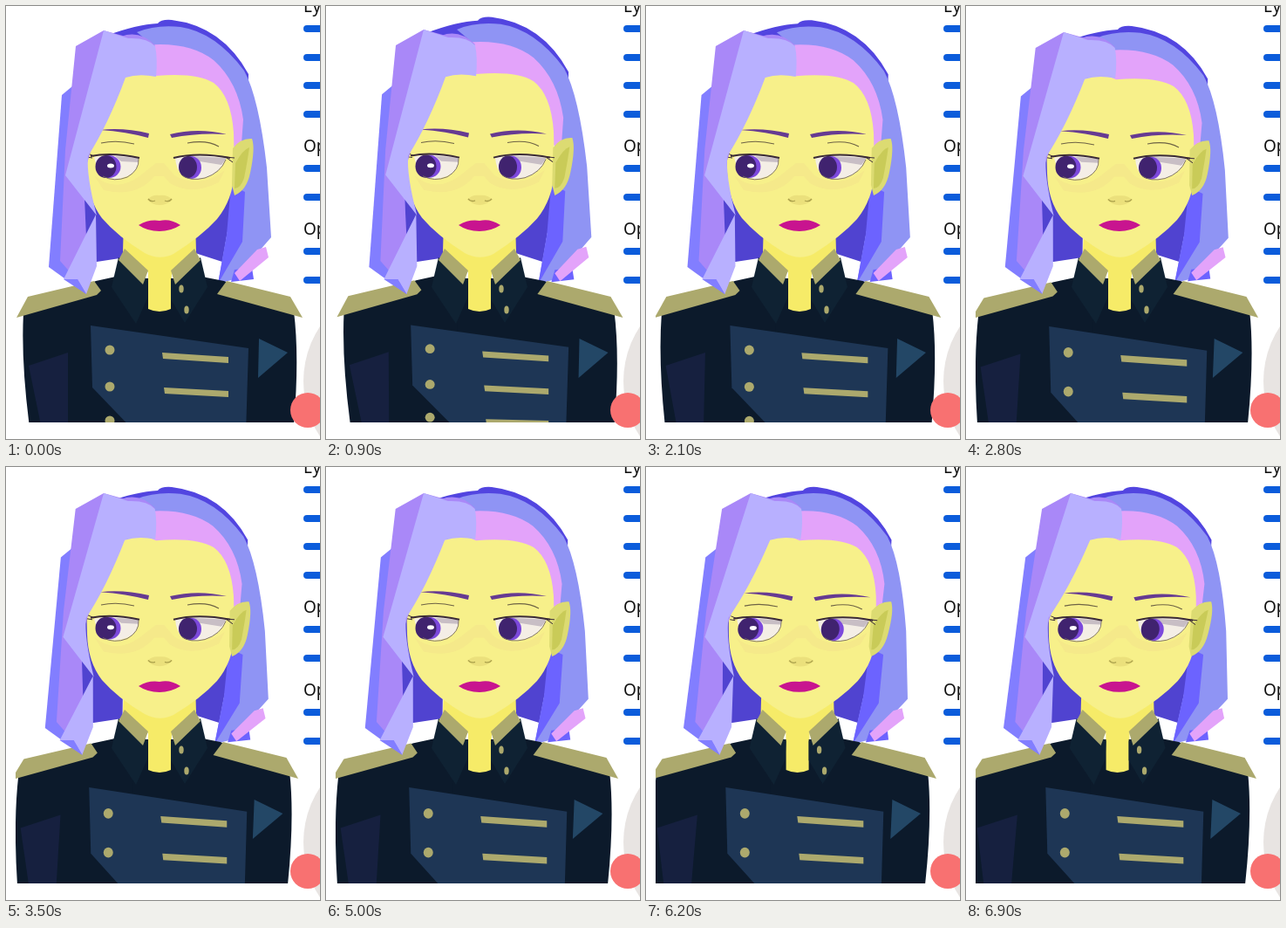
Recreate the animation shown at these times as an HTML page with a canvas. Size 360 by 496 pixels, loop 7000 ms.

```html
<!DOCTYPE html>
<html lang="en">
<head>
<meta charset="utf-8">
<title>Avatar editor</title>
<style>
  html, body { margin: 0; width: 100%; height: 100%; overflow: hidden; background: #fff; }
  body { position: relative; }
  canvas { position: absolute; left: 0; top: 0; }
  .label { position: absolute; left: 341px; font: 19px/24px "Noto Sans", "Open Sans", sans-serif; color: #111; white-space: nowrap; }
  .bar { position: absolute; left: 341px; width: 60px; height: 8px; border-radius: 4px; background: #0b5cdb; }
  .disc { position: absolute; border-radius: 50%; }
  .grey { left: 341px; top: 316px; width: 228px; height: 228px; background: #e8e4e2; clip-path: inset(36px 0 0 0); }
  .coral { left: 326px; top: 443px; width: 40px; height: 40px; background: #f87171; }
</style>
</head>
<body>
<div class="disc grey"></div>
<canvas id="stage" width="360" height="496"></canvas>
<div class="disc coral"></div>
<script>
const ctx = document.getElementById('stage').getContext('2d');
const LOOP = 7000;

// Side panel: a label with evenly spaced sliders below it.
function sliders(text, y, count) {
  const add = (cls, top, content) => {
    const el = document.createElement('div');
    el.className = cls;
    el.style.top = top + 'px';
    el.textContent = content;
    document.body.append(el);
  };
  add('label', y - 38, text);
  for (let i = 0; i < count; i++) add('bar', y - 4 + i * 32.5, '');
}
sliders('Eyes', 26, 4);
sliders('Open', 186, 2);
sliders('Open', 281, 2);

// lift: crown down, turn: head to the right, sway: shoulders to the right
const rest = { lift: 0, turn: 0, sway: 0 };
const raised = { lift: -5, turn: 0, sway: 1 };
const sunk = { lift: 7, turn: 0, sway: -7 };
const turned = { lift: 7, turn: 8, sway: -10 };
const keys = [[0, rest], [1500, raised], [2800, sunk], [5000, sunk], [6200, turned], [LOOP, turned]];

// Matrix that shifts height y1 by (dx1, dy1), height y2 by (dx2, dy2), and linearly between.
function slide(y1, dx1, dy1, y2, dx2, dy2) {
  const kx = (dx2 - dx1) / (y2 - y1), ky = (dy2 - dy1) / (y2 - y1);
  return [1, 0, kx, 1 + ky, dx1 - kx * y1, dy1 - ky * y1];
}

const moves = {
  back: p => slide(16, p.turn * .75, p.lift, 290, p.sway * .5, 0),
  face: p => slide(80, p.turn * .5, p.lift * .6, 288, 0, 0),
  features: p => slide(184, p.turn * .35, p.turn * .1 + p.lift * .1, 251, 0, 0),
  ear: p => slide(155, (p.sway + p.turn) / 2, p.lift * .3, 217, p.sway * .4, 0),
  front: p => slide(29, p.turn, p.lift * .3, 299, p.sway * .6, 0),
  collar: p => slide(0, -p.turn * .3, 0, 1, -p.turn * .3, 0),
  left: p => slide(315, p.sway * .5, p.lift * .2, 477, p.sway * 1.9, p.lift * .2),
  right: p => slide(315, p.sway * .6, 0, 477, p.sway, 0),
  panel: p => {
    const dx = p.sway * .25 - p.turn * .4;
    return slide(394, dx, p.lift * .4, 436, dx, p.lift * .8);
  }
};

const fill = (color, d) => ({ color, path: new Path2D(d) });
const line = (color, width, d) => ({ color, width, path: new Path2D(d) });
const dot = (color, x, y, rx, ry = rx) => {
  const path = new Path2D();
  path.ellipse(x, y, rx, ry, 0, 0, 7);
  return { color, path };
};

const navy = '#0c1a2b', coat = '#1e3655', lapel = '#0f2233', khaki = '#aca96d';
const skin = '#f7f08a', neck = '#f6eb68', brow = '#663a92', ink = '#3a2a37';
const white = '#f4eee6', shade = '#c8bec5', iris = '#40236f', glow = '#7c48dc';
const indigo = '#5245e0', violet = '#6c63ff', pink = '#e3a3fa';
const mauve = '#a988f8', lilac = '#b8b0ff', blue = '#827eff';

// Painted in order, back to front.
const layers = [
  ['back', [
    fill('#5043d0', 'M86 120L86 293 104 293 137 288 137 230 215 230 217 283 248 293 264 200 200 120Z'),
    fill(indigo, 'M115 34Q150 21 174 20Q178 15 190 16Q248 23 278 78L277 160 230 60 150 50Z'),
    fill('#8f94f4', 'M150 30Q172 21 200 24Q240 30 273 74Q290 105 299 185L304 265 262 313 243 318 262 215 266 150 220 60 172 48Z'),
    fill(violet, 'M258 205L274 213 271 270 243 318 253 262Z'),
    fill(violet, 'M262 302L282 300 284 313 258 316Z'),
    fill(pink, 'M288 279L298 276 301 288 268 315 262 306Z'),
    fill(pink, 'M150 46Q207 38 238 62Q266 87 272 130L270 158 264 168 240 110 160 86Z')
  ]],
  ['collar', [
    fill(neck, 'M135 245L217 245 218 282 190 305 189 349 163 349 163 305 134 282Z')
  ]],
  ['left', [
    fill(navy, 'M103 315L135 308 160 345 205 348 205 490 28 490Q17 410 20 352Z'),
    fill('#16203f', 'M26 412L71 397 71 490 42 490Z'),
    fill(khaki, 'M101 315L109 326 104 331 12 357 25 333Z')
  ]],
  ['right', [
    fill(navy, 'M250 315L214 308 190 346 150 348 150 490 329 490Q337 405 330 350Z'),
    fill('#234766', 'M290 381L323 397 289 426Z'),
    fill(khaki, 'M253 315L242 330 340 357 326 333Z')
  ]],
  ['panel', [
    fill(coat, 'M97 366L278 392 275 490 150 490 99 437Z'),
    fill(khaki, 'M179 397L255 402 255 409 180 404Z'),
    fill(khaki, 'M181 437L255 441 255 448 182 444Z'),
    fill(khaki, 'M183 477L255 479 255 486 184 484Z'),
    dot(khaki, 119, 394, 5.5), dot(khaki, 119, 436, 5.5), dot(khaki, 119, 475, 5.5)
  ]],
  // keeps the body inside its viewport when the panel stretches
  ['collar', [
    fill(navy, 'M150 312L203 312 204 362 150 362Z'),
    fill(neck, 'M163 298L189 298 189 347Q176 353 163 347Z'),
    fill(lapel, 'M129 288L163 314 162 335 149 364 121 322Z'),
    fill(lapel, 'M223 288L189 314 189 336 205 363 231 322Z'),
    fill(khaki, 'M136 278L163 303 157 319 129 291Z'),
    fill(khaki, 'M216 278L189 303 194 319 223 291Z'),
    dot(khaki, 201, 324, 2.7, 4.5), dot(khaki, 207, 348, 2.7, 4.5)
  ]],
  ['face', [
    fill(skin, 'M92 150L104 100 145 68 172 80Q218 76 238 88Q258 103 261 145L262 190Q260 222 242 244Q224 264 192 284Q176 292 159 283Q128 264 110 243Q94 222 93 190Z')
  ]],
  ['ear', [
    fill('#dcdb72', 'M260 163Q269 151 282 152Q286 163 280 191Q276 211 262 217L259 205Z'),
    fill('#c9cb58', 'M263 180Q272 164 279 162Q277 177 273 197Q269 209 262 209Z')
  ]],
  ['features', [
    fill('#f5e98a', 'M101 194Q125 215 153 195L172 180 181 180 193 194Q222 211 251 188L244 202Q212 218 188 203L181 195 170 195Q150 220 112 211Z'),
    fill('#ebe07c', 'M162 222Q167 216 176 217Q185 216 191 222Q184 228 176 228Q168 228 162 222Z'),
    line('#aaa04b', 1.3, 'M163 221Q166 225 171 223M182 223Q187 225 190 221'),
    fill(brow, 'M108 142Q135 139 164 146L163 151Q138 144 108 142Z'),
    fill(brow, 'M188 147Q220 139 253 147Q220 145 190 151Z'),
    line('#6e6345', 1.1, 'M109 157Q127 153 147 158M208 157Q230 153 244 161'),
    // left eye
    fill(white, 'M101 173Q121 168 152 174Q153 186 143 193Q127 202 111 195Q104 187 101 173Z'),
    fill(shade, 'M125 172L152 174 152 179 132 178Z'),
    dot(glow, 118, 184, 13.5, 13), dot(iris, 114.5, 184, 12, 13), dot('#fff', 120, 183, 4, 2.5),
    line(ink, 2, 'M97 172Q121 167 153 174'),
    line('#776a62', .9, 'M152 175Q153 188 139 196Q124 202 111 195'),
    line(ink, 1, 'M101 172L94 169M99 174L93 173'),
    // right eye
    fill(white, 'M194 174Q221 168 252 174Q249 188 231 196Q213 201 202 194Q195 187 194 174Z'),
    fill(shade, 'M211 172L253 174 247 182 222 178Z'),
    dot(glow, 212, 185, 12, 13), dot(iris, 208.5, 184.5, 10.5, 12.5),
    line(ink, 2, 'M192 174Q220 167 257 174'),
    line('#776a62', .9, 'M252 176Q246 191 228 197Q211 201 202 194'),
    line(ink, 1, 'M251 173L262 174M253 174L260 179'),
    fill('#c8148f', 'M152 251Q164 244 176 246Q188 243 200 251Q189 258 176 258Q162 258 152 251Z')
  ]],
  ['front', [
    fill(blue, 'M76 92L64 102 49 299 92 330 90 220Z'),
    fill(mauve, 'M80 46L112 28 141 36 118 95 93 180 90 222 92 264 85 318 62 292 68 165Z'),
    fill(mauve, 'M132 35Q153 27 171 45L160 58Z'),
    fill(lilac, 'M112 28L140 37Q162 36 171 46Q174 61 172 81Q152 77 137 82Q117 136 94 172Q92 194 104 240L68 194Z'),
    fill(lilac, 'M103 239L104 298 92 330 82 313 66 313Z'),
    fill(blue, 'M66 313L82 313 92 330Z')
  ]]
];

function poseAt(t) {
  const i = keys.findIndex((key, n) => t < keys[n + 1][0]);
  const [t0, from] = keys[i], [t1, to] = keys[i + 1];
  const u = (t - t0) / (t1 - t0), k = u * u * (3 - 2 * u);
  const pose = {};
  for (const name in from) pose[name] = from[name] + (to[name] - from[name]) * k;
  return pose;
}

function draw(t) {
  const pose = poseAt(t);
  ctx.clearRect(0, 0, 360, 496);
  ctx.save();
  ctx.beginPath();
  ctx.rect(11, 0, 349, 477);
  ctx.clip();
  for (const [part, shapes] of layers) {
    ctx.setTransform(...moves[part](pose));
    for (const { color, width, path } of shapes) {
      if (width) {
        ctx.strokeStyle = color;
        ctx.lineWidth = width;
        ctx.stroke(path);
      } else {
        ctx.fillStyle = color;
        ctx.fill(path);
      }
    }
  }
  ctx.restore();
}

const start = performance.now();
function tick() {
  const t = (performance.now() - start) % LOOP;
  draw(Math.floor(t / 100) * 100);
  requestAnimationFrame(tick);
}
tick();
</script>
</body>
</html>
```
